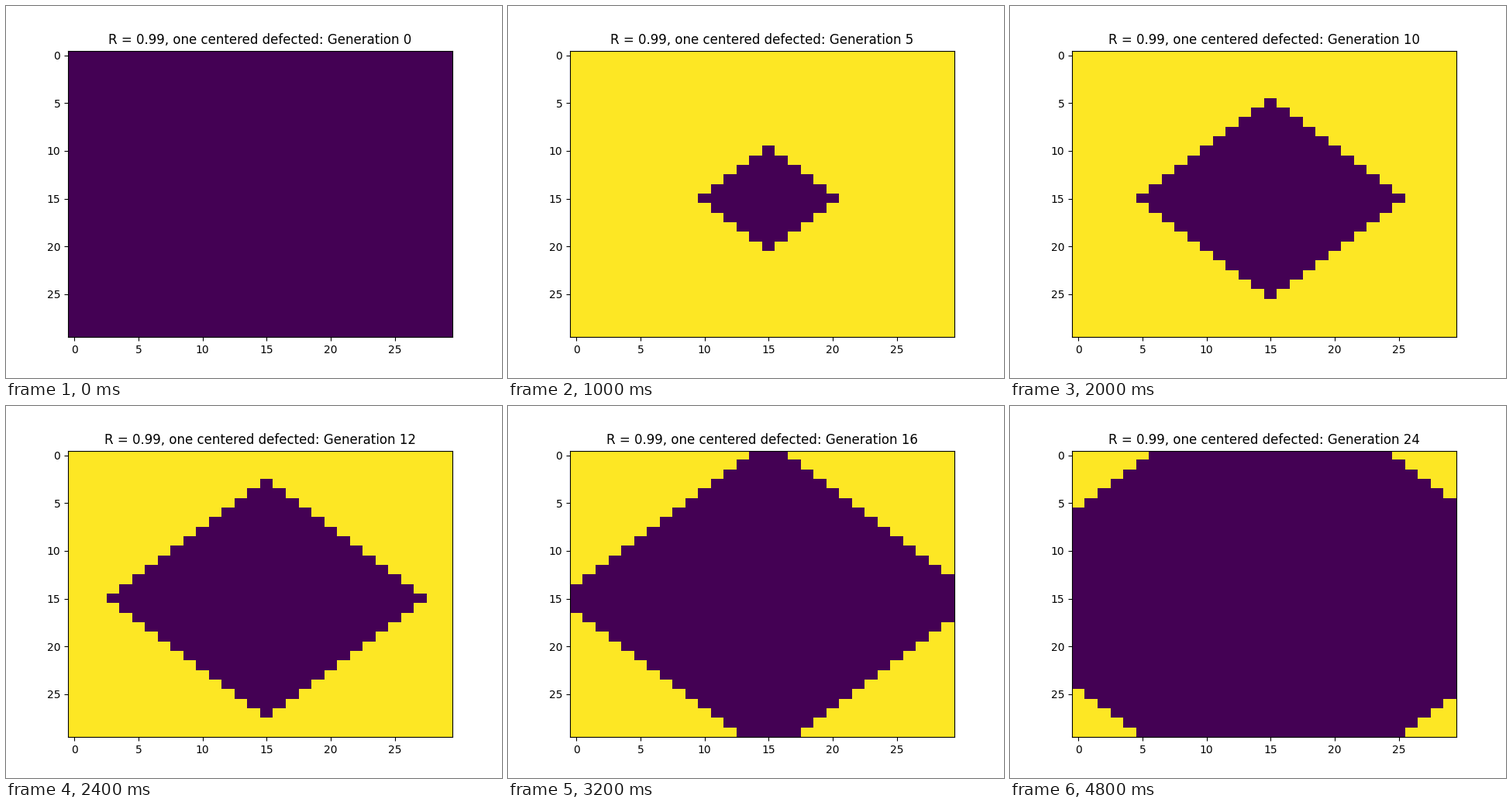
A matplotlib script that plays this animation: 640x480 px, repeating every 5 s.

```python
import matplotlib.pyplot as plt
import numpy as np
from matplotlib.animation import FuncAnimation

SIZE = 30
CENTER = 15
GENERATIONS = 25
INTERVAL = 200

rows, cols = np.indices((SIZE, SIZE))
distance = abs(rows - CENTER) + abs(cols - CENTER)


def cooperators(generation):
    """Grid of 1 (cooperates) and 0 (defects); the start is uniform."""
    if generation == 0:
        return np.zeros((SIZE, SIZE))
    return (distance > generation).astype(float)


fig, ax = plt.subplots(figsize=(6.4, 4.8), dpi=100)
image = ax.imshow(cooperators(0), cmap="viridis", vmin=0, vmax=1,
                  aspect="auto", interpolation="nearest")
title = ax.set_title("")


def update(generation):
    image.set_data(cooperators(generation))
    title.set_text(f"R = 0.99, one centered defected: Generation {generation}")
    return image, title


anim = FuncAnimation(fig, update, frames=GENERATIONS, interval=INTERVAL,
                     repeat=True, repeat_delay=0, blit=False)
plt.show()
```
